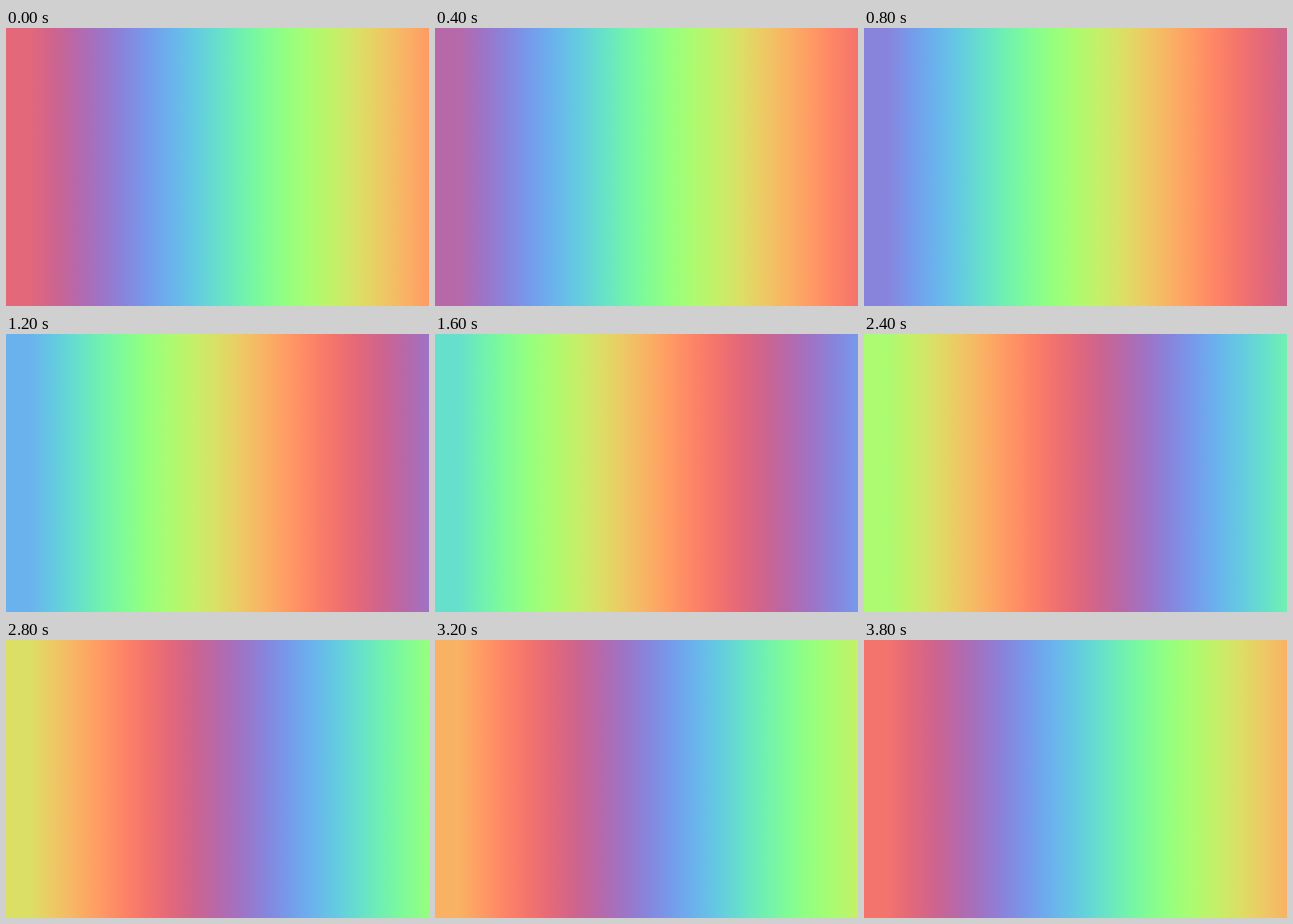
Animation of 440x290 px, one loop 4 s. Source, as an HTML page:

```html
<!DOCTYPE html>
<html lang="en">
<head>
<meta charset="utf-8">
<title>Rainbow drift</title>
<style>
  html, body { margin: 0; width: 100%; height: 100%; overflow: hidden; }
</style>
</head>
<body>
<script>
const STEPS = 20;      // colours in one turn of the wheel
const STOPS = 18;      // colours visible at once
const STEP_MS = 200;

// Cosine wave from 0 to 1 with its crest at the given step
const wave = (k, crest) => (1 + Math.cos((k - crest) / STEPS * 2 * Math.PI)) / 2;

function colour(k) {
  const r = 100 + 155 * wave(k, 17.22);
  const g = 100 + 155 * wave(k, 11);
  const b = 100 + 138 * wave(k, 5.65) ** 2;
  return `rgb(${[r, g, b].map(Math.round)})`;
}

function draw(step) {
  const stops = Array.from({ length: STOPS }, (_, i) =>
    `${colour(step + i)} ${(i + 1) / STOPS * 100}%`);
  document.body.style.background = `linear-gradient(90deg, ${stops})`;
}

const start = performance.now();
let shown = -1;

function tick() {
  const step = Math.floor((performance.now() - start) / STEP_MS) % STEPS;
  if (step !== shown) draw(shown = step);
  requestAnimationFrame(tick);
}
tick();
</script>
</body>
</html>
```
